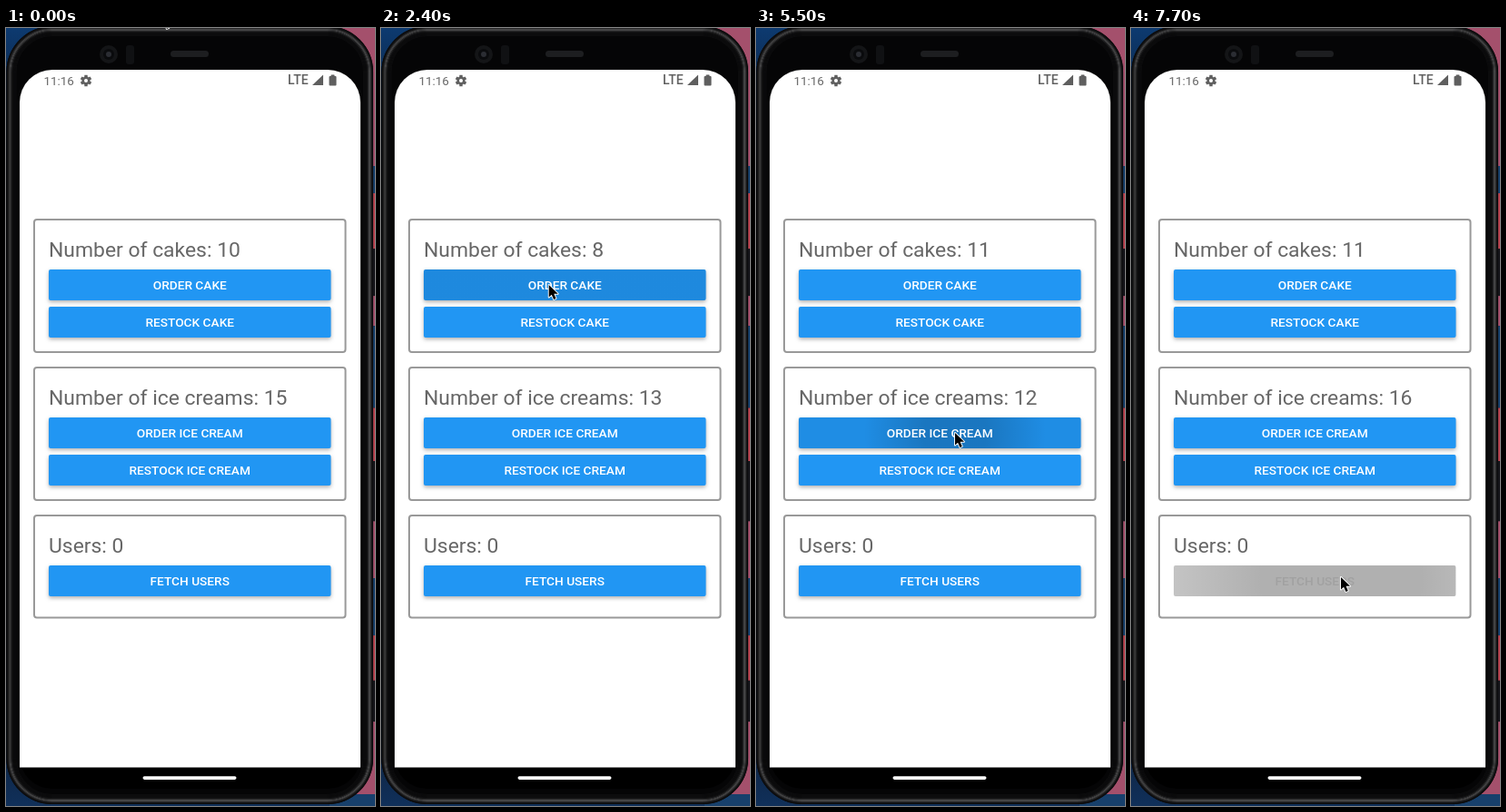
Recreate the animation shown at these times as an HTML page with a canvas. Size 406 by 857 pixels, loop 8000 ms.

```html
<!DOCTYPE html>
<html lang="en">
<head>
<meta charset="utf-8">
<title>Cake shop app</title>
<style>
  html, body { margin: 0; width: 100%; height: 100%; overflow: hidden; background: #000; }
  canvas { display: block; width: 406px; height: 857px; }
</style>
</head>
<body>
<canvas id="stage"></canvas>
<script>
const W = 406, H = 857, LOOP = 8000, STEP = 100, LAST = 7700;
const BX = 47, BW = 310.5, BH = 34;
const INK = '#676767', ICON = '#5f5f5f';
const canvas = document.getElementById('stage');
const ctx = canvas.getContext('2d');
const dpr = window.devicePixelRatio || 1;
canvas.width = W * dpr;
canvas.height = H * dpr;
ctx.scale(dpr, dpr);

const start = { cakes: 10, creams: 15 };

// Each button: label and what a tap adds to the stock
const cards = [
  { title: s => 'Number of cakes: ' + s.cakes, buttons: [
    { text: 'ORDER CAKE', add: { cakes: -1, creams: -1 } },
    { text: 'RESTOCK CAKE', add: { cakes: 3 } }
  ] },
  { title: s => 'Number of ice creams: ' + s.creams, buttons: [
    { text: 'ORDER ICE CREAM', add: { creams: -1 } },
    { text: 'RESTOCK ICE CREAM', add: { creams: 5 } }
  ] },
  { title: () => 'Users: 0', buttons: [
    { text: 'FETCH USERS', add: {}, once: true }
  ] }
];

// Lay the cards and their buttons out in a column
cards.forEach((card, i) => {
  card.y = 210 + 163 * i;
  card.h = 81 + 33.5 * card.buttons.length;
  card.buttons.forEach((b, j) => { b.y = card.y + 56 + 41 * j; });
});
const buttons = cards.flatMap(card => card.buttons);

// Taps: time and button
const taps = [[1600, 0], [1800, 0], [3800, 1], [5400, 2], [5620, 2], [6550, 3], [7480, 4]]
  .map(([at, i]) => ({ at, button: buttons[i] }));

// Pointer moves: begin, end, x, y
const moves = [
  [0, 0, 171.5, -15], [300, 1200, 184.7, 283], [2900, 3400, 185.7, 320],
  [4700, 5100, 219, 446], [5700, 6000, 224.7, 488.5], [6600, 7100, 231, 605]
];

const ease = p => p * p * (3 - 2 * p);
const clamp = p => Math.max(0, Math.min(1, p));

function pointerAt(t) {
  let x = 0, y = 0;
  for (const [t0, t1, x1, y1] of moves) {
    const e = t1 > t0 ? ease(clamp((t - t0) / (t1 - t0))) : 1;
    x += (x1 - x) * e;
    y += (y1 - y) * e;
  }
  return [x, y];
}

function stockAt(t) {
  const s = { ...start };
  for (const { at, button } of taps) {
    if (t < at + 80) break;
    for (const key in button.add) s[key] += button.add[key];
  }
  return s;
}

function random(seed) {
  return () => (seed = (seed * 16807) % 2147483647) / 2147483647;
}

function shape(x, y, w, h, r) {
  ctx.beginPath();
  ctx.roundRect(x, y, w, h, r);
}

function box(x, y, w, h, r, fill) {
  shape(x, y, w, h, r);
  ctx.fillStyle = fill;
  ctx.fill();
}

function outline(x, y, w, h, r, color, width) {
  shape(x, y, w, h, r);
  ctx.strokeStyle = color;
  ctx.lineWidth = width;
  ctx.stroke();
}

function disc(x, y, r, fill) {
  box(x - r, y - r, 2 * r, 2 * r, r, fill);
}

function poly(points, fill) {
  ctx.beginPath();
  points.forEach(p => ctx.lineTo(p[0], p[1]));
  ctx.closePath();
  ctx.fillStyle = fill;
  ctx.fill();
}

function label(text, x, y, size, fill, weight = 400, align = 'left') {
  ctx.font = `${weight} ${size}px Roboto, sans-serif`;
  ctx.textAlign = align;
  ctx.fillStyle = fill;
  ctx.fillText(text, x, y);
}

function wallpaper() {
  const sky = ctx.createLinearGradient(0, 0, 0, H);
  sky.addColorStop(0, '#0d3a70');
  sky.addColorStop(.2, '#0b0f18');
  sky.addColorStop(.8, '#0b0f18');
  sky.addColorStop(1, '#10305a');
  ctx.fillStyle = sky;
  ctx.fillRect(0, 0, W, H);

  const rnd = random(11);
  const tints = ['#a4506c', '#17406c', '#b8434f', '#17171c'];
  for (let y = 0, i = 0; y < H; i++) {
    const h = i ? 30 + 70 * rnd() : 152;
    ctx.fillStyle = tints[i % tints.length];
    ctx.fillRect(W - 50, y, 50, h);
    y += h;
  }
}

function phone() {
  box(.5, -2, 403.5, 857, 50, '#050506');
  // Metal rim: nested outlines with one soft highlight
  for (let i = 0; i < 11; i++) {
    const v = Math.round(12 + 62 * Math.exp(-(((i - 3.5) / 1.7) ** 2)));
    outline(1 + i, -1.5 + i, 402.5 - 2 * i, 856 - 2 * i, 50 - i, `rgb(${v},${v},${v + 1})`, 1.1);
  }

  disc(113, 29, 10, '#141517');
  disc(113, 29, 6, '#0a0b0d');
  disc(113, 29, 3, '#2b2d33');
  box(132, 19, 9, 21, 3, '#101113');
  box(181, 25, 42, 7, 3.5, '#1d1e20');

  box(15, 46, 375, 792, 36, '#000');
  box(15, 46, 375, 768.5, [36, 36, 0, 0], '#fff');
  box(150.5, 824.3, 103, 3.6, 1.8, '#fff');
}

function gear(x, y) {
  ctx.save();
  ctx.translate(x, y);
  for (let i = 0; i < 6; i++) {
    box(-1.7, -6.2, 3.4, 4, 0, ICON);
    ctx.rotate(Math.PI / 3);
  }
  disc(0, 0, 4.6, ICON);
  disc(0, 0, 2, '#fff');
  ctx.restore();
}

function statusBar() {
  label('11:16', 41.5, 63, 13.4, INK);
  gear(88, 58);
  label('LTE', 310, 62, 14, ICON, 500);
  poly([[337, 63], [349, 63], [349, 51.5]], ICON);
  box(355.5, 53, 8, 10.5, 1, ICON);
  box(357.5, 51.5, 4, 2, .5, ICON);
}

function ripple(age, x, y) {
  if (age < 0 || age >= 740) return;
  const a = .21 * Math.min(1, (age + 60) / 100, (740 - age) / 340);
  const r = 40 + 180 * (age / 200) ** 1.6;
  const g = ctx.createRadialGradient(x, y, r * .35, x, y, r);
  g.addColorStop(0, `rgba(0,0,0,${a})`);
  g.addColorStop(1, `rgba(0,0,0,${a * .3})`);
  ctx.fillStyle = g;
  ctx.fillRect(BX, y - BH, BW, 2 * BH);
}

function drawButton(b, t) {
  const hits = taps.filter(tap => tap.button === b && tap.at <= t);
  const off = b.once && hits.length > 0;
  ctx.save();
  if (!off) {
    ctx.shadowColor = 'rgba(0,0,0,.3)';
    ctx.shadowBlur = 4 * dpr;
    ctx.shadowOffsetY = 2 * dpr;
  }
  box(BX, b.y, BW, BH, 2, off ? '#dfdfdf' : '#2196f3');
  ctx.restore();

  ctx.save();
  shape(BX, b.y, BW, BH, 2);
  ctx.clip();
  for (const { at } of hits) ripple(t - at, pointerAt(at)[0], b.y + BH / 2);
  ctx.restore();
  label(b.text, BX + BW / 2, b.y + 22, 13.7, off ? '#a1a1a1' : '#fff', 500, 'center');
}

function drawCard(card, t) {
  outline(31, card.y + 1, 342.5, card.h - 2, 3, '#999', 2);
  label(card.title(stockAt(t)), 47, card.y + 42, 22.9, INK);
  card.buttons.forEach(b => drawButton(b, t));
}

function pointer(t) {
  ctx.save();
  ctx.translate(...pointerAt(t));
  ctx.scale(.93, .93);
  poly([[0, 0], [0, 14.6], [3.3, 11.5], [5.8, 17.2], [8.4, 16], [6, 10.6], [10.8, 10.6]], '#000');
  ctx.lineJoin = 'round';
  ctx.lineWidth = 2;
  ctx.strokeStyle = '#fff';
  ctx.stroke();
  ctx.fill();
  ctx.restore();
}

function draw(t) {
  wallpaper();
  phone();
  statusBar();
  cards.forEach(card => drawCard(card, t));
  pointer(t);
}

const begin = performance.now();
function tick() {
  const t = (performance.now() - begin) % LOOP;
  draw(Math.min(LAST, Math.floor(t / STEP) * STEP));
  requestAnimationFrame(tick);
}
tick();
</script>
</body>
</html>
```
